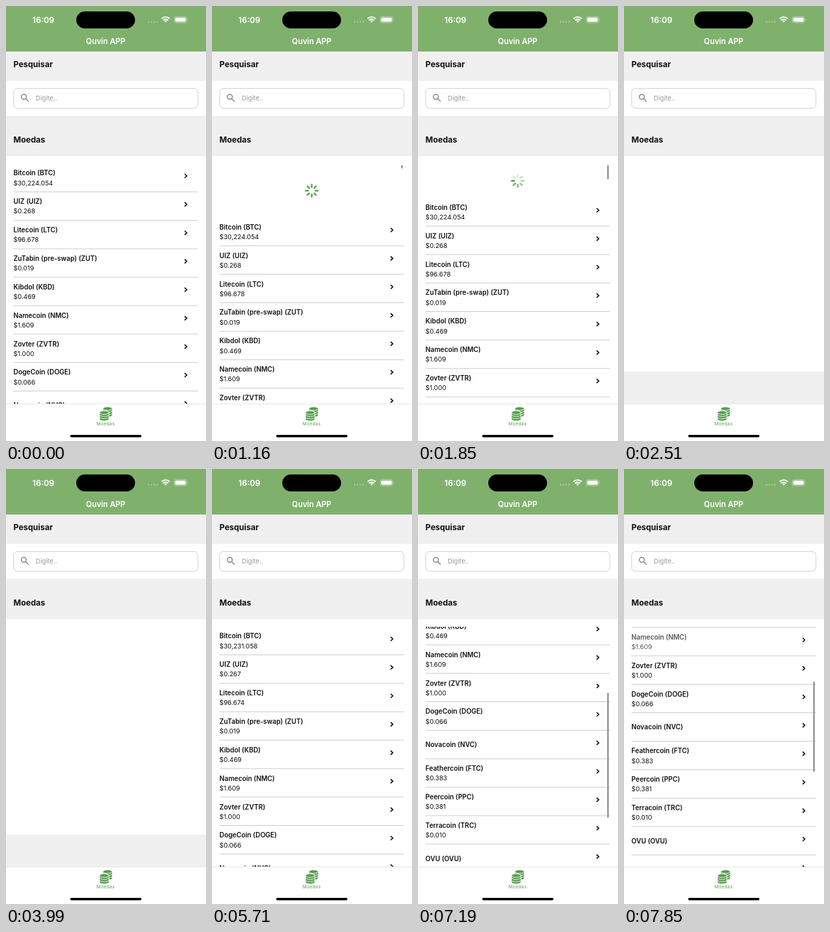
An HTML page for the animation above (8000 ms loop, 296 by 640 pixels).

```html
<!DOCTYPE html>
<html lang="pt">
<head>
<meta charset="utf-8">
<title>Moedas</title>
<style>
html, body { margin: 0; width: 100%; height: 100%; overflow: hidden; background: #fff; }
svg { display: block; width: 100vw; height: 100vh; }
text { font-family: Inter, Roboto, sans-serif; fill: #111; }
.head { font-size: 12px; font-weight: 700; }
.name { font-size: 9.9px; font-weight: 600; }
.price { font-size: 9.6px; }
.chev { fill: none; stroke: #111; stroke-width: 1.6; }
</style>
</head>
<body>
<svg viewBox="0 0 296 640">
  <defs><clipPath id="view"><rect y="232" width="296" height="353"/></clipPath></defs>
  <rect width="296" height="640" fill="#fff"/>

  <rect width="296" height="67" fill="#7fb16d"/>
  <text x="39" y="24.5" style="font-size:12.2px;font-weight:600;fill:#fff">16:09</text>
  <rect x="104" y="8" width="87" height="25" rx="12.5"/>
  <g fill="#fff" opacity=".4">
    <circle cx="211" cy="23.3" r="1.1"/><circle cx="215.2" cy="23.3" r="1.1"/>
    <circle cx="219.4" cy="23.3" r="1.1"/><circle cx="223.6" cy="23.3" r="1.1"/>
  </g>
  <g fill="none" stroke="#fff" stroke-width="1.9">
    <path d="M230.3 18.6a8.4 8.4 0 0 1 12 0M232.5 21.1a5.4 5.4 0 0 1 7.6 0"/>
    <path d="M234.3 22.3a2.9 2.9 0 0 1 4 0L236.3 24.4z" fill="#fff" stroke="none"/>
  </g>
  <rect x="249" y="15.5" width="18.5" height="9.2" rx="2.8" fill="none" stroke="#fff" stroke-opacity=".5" stroke-width=".8"/>
  <rect x="250.4" y="16.9" width="15.7" height="6.4" rx="1.7" fill="#fff"/>
  <path d="M268.7 18.6q1.5 1.5 0 3z" fill="#fff" opacity=".6"/>
  <text x="147.5" y="56.2" text-anchor="middle" style="font-size:11.4px;font-weight:600;fill:#fff">Quvin APP</text>

  <rect y="67" width="296" height="43" fill="#f0f0f0"/>
  <text class="head" x="11" y="90.3">Pesquisar</text>
  <rect x="11.4" y="121.4" width="272.6" height="29" rx="5.5" fill="#fff" stroke="#ccc" stroke-width=".9"/>
  <g fill="none" stroke="#8a8a8a" stroke-width="1.5">
    <circle cx="26.4" cy="133.6" r="3.7"/><path d="M29.1 136.3L33.6 140.8"/>
  </g>
  <text x="44" y="139" style="font-size:9.6px;fill:#999">Digite..</text>
  <rect y="161.5" width="296" height="59.5" fill="#f0f0f0"/>
  <text class="head" x="11" y="201.3">Moedas</text>

  <g clip-path="url(#view)">
    <g id="spin"></g>
    <g id="list"></g>
    <rect id="bar" x="280.1" width="2.2" rx="1.1" fill="#8c8c8c"/>
  </g>
  <rect id="gap" y="538" width="296" height="47" fill="#f0f0f0"/>

  <rect y="585" width="296" height="55" fill="#fff"/>
  <rect y="585" width="296" height=".8" fill="#e2e2e2"/>
  <g id="coins" fill="#559d4e" stroke="#fff" stroke-width=".9"></g>
  <text x="147.5" y="617.4" text-anchor="middle" style="font-size:6.5px;letter-spacing:.4px;fill:#559d4e">Moedas</text>
  <rect x="95" y="631" width="105.5" height="3.6" rx="1.8"/>
</svg>
<script>
const LOOP = 8000, TOP = 232, VIEW = 352, ROW = 41.86;
const $ = id => document.getElementById(id);

function add(parent, tag, attrs, text) {
  const el = document.createElementNS('http://www.w3.org/2000/svg', tag);
  for (const key in attrs) el.setAttribute(key, attrs[key]);
  if (text) el.textContent = text;
  return parent.appendChild(el);
}
function set(el, attrs) {
  for (const key in attrs) el.setAttribute(key, attrs[key]);
}

// name, price, price after the refresh
const coins = [
  ['Bitcoin (BTC)', '$30,224.054', '$30,231.058'],
  ['UIZ (UIZ)', '$0.268', '$0.267'],
  ['Litecoin (LTC)', '$96.678', '$96.674'],
  ['ZuTabin (pre-swap) (ZUT)', '$0.019'],
  ['Kibdol (KBD)', '$0.469'],
  ['Namecoin (NMC)', '$1.609'],
  ['Zovter (ZVTR)', '$1.000'],
  ['DogeCoin (DOGE)', '$0.066'],
  ['Novacoin (NVC)'],
  ['Feathercoin (FTC)', '$0.383'],
  ['Peercoin (PPC)', '$0.381'],
  ['Terracoin (TRC)', '$0.010'],
  ['OVU (OVU)'],
  ['']
];

const rows = coins.map(([name, price, fresh], i) => {
  const g = add($('list'), 'g', { transform: `translate(0 ${TOP + i * ROW})` });
  const label = add(g, 'g', {});
  add(label, 'text', { class: 'name', x: 11, y: price ? 17.4 : 24.4 }, name);
  const cost = add(label, 'text', { class: 'price', x: 11, y: 31.6 }, price);
  add(g, 'path', { class: 'chev', d: 'M264.4 15l3.2 3-3.2 3' });
  add(g, 'rect', { x: 11, y: ROW - .9, width: 273, height: .9, fill: '#c8c8c8' });
  return { label, cost, price, fresh };
});

const spokes = Array.from({ length: 8 }, (_, i) => add($('spin'), 'rect', {
  x: -1.25, y: -10.2, width: 2.5, height: 6, rx: 1.25, fill: '#5aa552', transform: `rotate(${i * 45})`
}));

function stack(x, y, count) {
  for (let i = count - 1; i >= 0; i--) {
    const cy = y + i * 3.3;
    add($('coins'), 'path', {
      d: `M${x - 7} ${cy}v3a7 2.7 0 0 0 14 0v-3a7 2.7 0 0 0-14 0z`
    });
  }
  add($('coins'), 'ellipse', { cx: x, cy: y, rx: 6.8, ry: 2.6 });
}
stack(150.3, 592.4, 3);
stack(145.3, 598.2, 3);

// [time, scroll offset]; negative values pull the list down
const steps = [
  [0, 0], [930, -14], [1040, -49], [1160, -79.5], [1270, -86], [1380, -89],
  [1490, -89], [1600, -78], [1710, -62], [1850, -50.5], [1960, -46], [2070, 0],
  [6650, 5], [6760, 25], [6860, 54], [6970, 98], [7080, 142], [7190, 182],
  [7310, 204], [7850, 207.8]
];

function draw(t) {
  const [at, off] = steps.filter(s => s[0] <= t).pop();
  const empty = t >= 2070 && t < 5710;
  const pull = Math.max(0, -off);

  set($('list'), { transform: `translate(0 ${-off})`, visibility: empty ? 'hidden' : 'visible' });
  set($('gap'), { visibility: empty ? 'visible' : 'hidden' });
  rows.forEach((row, i) => {
    const text = t >= 5710 && row.fresh || row.price || '';
    if (row.cost.textContent !== text) row.cost.textContent = text;
    const pressed = i === 0 && t >= 730 && t < 930 ? .85 : i === 5 && t >= 7850 ? .7 : 1;
    set(row.label, { opacity: pressed });
  });

  // Spokes fill in while pulling, then the fade runs clockwise
  const turning = t >= 1270;
  const lead = 6 + Math.floor((at - 1850) / 125);
  set($('spin'), {
    transform: `translate(147.6 ${TOP + pull / 2})`,
    visibility: pull > 0 ? 'visible' : 'hidden'
  });
  spokes.forEach((spoke, i) => {
    const behind = ((lead - i) % 8 + 8) % 8;
    const drawn = Math.min(1, Math.max(0, pull / 79 * 8 - i));
    set(spoke, { opacity: turning ? Math.max(.2, 1 - behind * .13) : drawn });
  });

  const content = t >= 7310 ? 931 : 673;
  const size = pull ? Math.max(5, 48.8 - .55 * pull) : VIEW * VIEW / content;
  set($('bar'), {
    y: TOP + 2 + Math.max(0, off) * VIEW / content,
    height: size,
    visibility: off && !(t >= 7310 && t < 7850) ? 'visible' : 'hidden'
  });
}

function tick() {
  draw(performance.now() % LOOP);
  requestAnimationFrame(tick);
}
tick();
</script>
</body>
</html>
```
